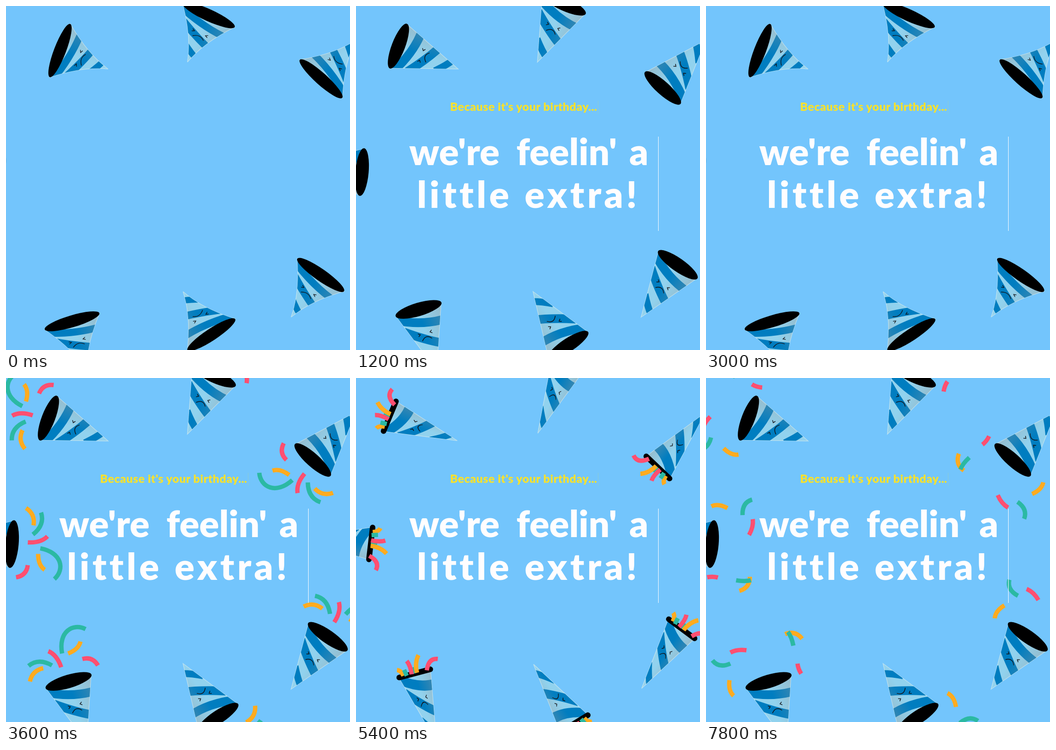
An HTML page for the animation above (8 s loop, 748 by 748 pixels).

```html
<!DOCTYPE html>
<html lang="en">
<head>
<meta charset="utf-8">
<title>Birthday poppers</title>
<style>
  html, body { margin: 0; width: 100%; height: 100%; overflow: hidden; background: #73c5fc; }
  svg { display: block; width: 100%; height: 100%; }
  text { font-family: Lato, "Open Sans", sans-serif; font-weight: 900; text-anchor: middle; }
  .small { font-size: 25px; letter-spacing: .5px; fill: #f7e12d; }
  .big { font-size: 80px; fill: #fffdfe; }
  .wide { letter-spacing: 6.5px; }
</style>
</head>
<body>
<svg viewBox="0 0 748 748">
  <defs id="defs">
    <linearGradient id="shade">
      <stop offset=".5" stop-color="#999" stop-opacity="0"/>
      <stop offset="1" stop-color="#999" stop-opacity=".4"/>
    </linearGradient>
    <g id="skin" fill="none">
      <g stroke="#007dc0" stroke-width="19">
        <path d="M-55-130Q0-102 50-103"/>
        <path d="M-45-101Q0-68 32-53"/>
        <path d="M-22-46Q-2-27 14-17" stroke-width="15"/>
      </g>
      <g stroke="#10151c" stroke-width="1.6" stroke-linecap="round">
        <path d="M-11-71Q0-83 10-71"/>
        <path d="M-16-88l4 3-4 3M14-88l-4 3 4 3"/>
      </g>
    </g>
  </defs>
  <g id="poppers"></g>
  <g id="lines">
    <g>
      <text class="small" x="364.5" y="228">Because it's your birthday...</text>
      <rect y="206" height="29" fill="#f7e12d"/>
    </g>
    <g>
      <text class="big" x="214" y="346">we're</text>
      <text class="big" x="458" y="346">feelin'</text>
      <text class="big" x="615" y="346">a</text>
      <text class="big wide" x="236" y="439">little</text>
      <text class="big wide" x="492" y="439">extra!</text>
      <rect y="284" height="205" fill="#fffdfe"/>
    </g>
  </g>
</svg>
<script>
const LOOP = 8000, POSE_TIME = 200;
const PINK = '#ff4f70', TEAL = '#2bb9a3', ORANGE = '#ffab1f';
const $ = id => document.getElementById(id);

// Tip position and rotation; an unrotated popper opens upwards.
const places = [
  [222, 137, -69], [394.5, 122, 24.5], [760, 75, -138], [-125.5, 349, 95],
  [175.5, 793, -16.5], [385, 621, 146.7], [620, 676.5, 35]
];

const shapes = {
  squash: { cone: 'M0 0Q-14-53-62-112H62Q14-53 0 0', skin: 'scale(1.19 .806)',
            mouth: '<ellipse cy="-112" rx="62" ry="13"/>' },
  normal: { cone: 'M0 0L-51-139H51Z', skin: '',
            mouth: '<ellipse cy="-139" rx="52" ry="14.5"/>' },
  stretch: { cone: 'M0-2L-38-158L32-156Z', skin: 'translate(-2 0) scale(.72 1.2)',
             mouth: '<path d="M-38-159L32-157" stroke="#000" stroke-width="12" stroke-linecap="round"/>' }
};

const start = [
  [ORANGE, 'M-25-159Q-27-172-35-175'], [TEAL, 'M-18-157L-20-171'], [TEAL, 'M1-157V-171'],
  [PINK, 'M-7-157Q-4-176-9-188'], [ORANGE, 'M5-157Q6-179 19-193'], [PINK, 'M27-156Q38-181 57-173']
];
// Flying confetti is laid out on the stage around the bottom left popper.
const burst = [
  [TEAL, 'M173 546C145 532 113 552 122 599'], [ORANGE, 'M162 573Q158 590 135 599'],
  [PINK, 'M92 594Q111 602 120 629'], [TEAL, 'M49 626Q71 608 100 625'],
  [ORANGE, 'M81 631Q57 636 52 660'], [PINK, 'M166 611Q188 605 200 625']
];
const scatter = [
  [PINK, 'M53 597Q68 589 88 592'], [TEAL, 'M14 614Q28 632 53 621'],
  [ORANGE, 'M51 657Q48 680 60 691'], [ORANGE, 'M172 557Q194 548 209 567'],
  [TEAL, 'M178 552Q186 562 190 582'], [PINK, 'M199 621Q200 632 207 643']
];
const onStage = 'rotate(16.5) translate(-175.5 -793)';

const poses = [
  [shapes.squash], [shapes.normal], [shapes.stretch, start, 'translate(-3 -1)'],
  [shapes.normal, burst, onStage], [shapes.normal, scatter, onStage]
];

function poseMarkup([shape, confetti = [], transform = ''], i) {
  const strips = confetti.map(([color, d]) => `<path d="${d}" stroke="${color}"/>`).join('');
  return `<clipPath id="clip${i}"><path d="${shape.cone}"/></clipPath>
    <g id="pose${i}">
      <path d="${shape.cone}" fill="#91d2ee" stroke="#b9e0ef" stroke-width="1.5"/>
      <g clip-path="url(#clip${i})">
        <use href="#skin" transform="${shape.skin}"/>
        <path d="${shape.cone}" fill="url(#shade)"/>
      </g>
      ${shape.mouth}
      <g transform="${transform}" fill="none" stroke-width="9.5">${strips}</g>
    </g>`;
}

$('defs').innerHTML += poses.map(poseMarkup).join('');
$('poppers').innerHTML = places.map(([x, y, angle]) =>
  `<use transform="translate(${x} ${y}) rotate(${angle})"/>`).join('');

const uses = [...$('poppers').children];
const [small, big] = $('lines').children;
const easeOut = p => 1 - (1 - Math.min(1, Math.max(0, p))) ** 3;

// A block grows from the left, then withdraws to the right and uncovers the text.
function reveal(group, time, left, right, sliver) {
  const grow = easeOut(time / 156), shrink = easeOut((time - 156) / 344);
  const block = group.querySelector('rect');
  const from = left + (right - left - sliver) * shrink;
  block.setAttribute('x', from);
  block.setAttribute('width', left + (right - left) * grow - from);
  group.style.display = time > 0 ? '' : 'none';
  for (const text of group.querySelectorAll('text'))
    text.style.visibility = time >= 156 ? 'visible' : 'hidden';
}

function draw(now) {
  const time = Math.floor(now % LOOP / 50) * 50;
  const pose = Math.floor(time / POSE_TIME) % poses.length;
  for (const use of uses) use.setAttribute('href', '#pose' + pose);
  reveal(small, time - 50, 202, 527, .2);
  reveal(big, time - 350, 91, 658, 1);
  requestAnimationFrame(draw);
}
requestAnimationFrame(draw);
</script>
</body>
</html>
```
